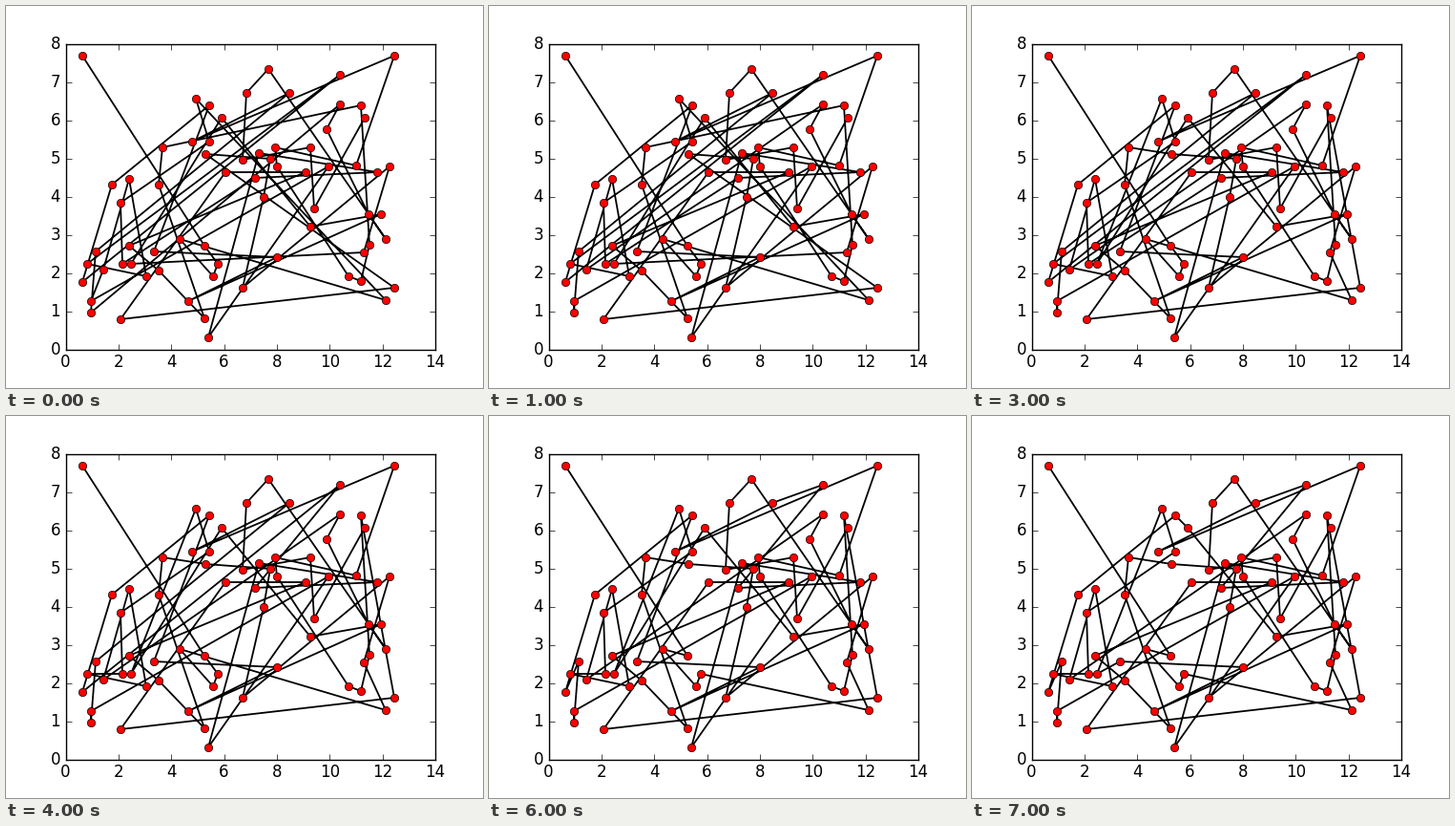
Animation, 500 px wide and 400 px high, one loop 8 s. Source, as a matplotlib script:

```python
import matplotlib.pyplot as plt
import numpy as np
from matplotlib.animation import FuncAnimation

plt.rcParams["font.family"] = "DejaVu Sans"
plt.rcParams["font.size"] = 12

STEP_MS = 1000

# Cities in the order of the first route, in stage pixels.
CITIES = [
    (80, 52), (208, 251), (222, 270), (217, 283), (182, 244), (398, 308),
    (199, 97), (213, 142), (120, 206), (122, 270), (261, 180), (389, 174),
    (265, 154), (212, 347), (338, 168), (89, 309), (102, 276), (129, 181),
    (147, 283), (85, 270), (350, 72), (80, 289), (111, 187), (213, 104),
    (155, 257), (284, 263), (191, 309), (393, 218), (319, 231), (226, 117),
    (131, 270), (375, 258), (402, 168), (248, 295), (270, 200), (277, 160),
    (209, 155), (407, 295), (120, 328), (230, 174), (314, 174), (129, 251),
    (160, 277), (208, 327), (160, 187), (164, 148), (372, 104), (381, 250),
    (372, 288), (359, 283), (284, 168), (282, 148), (367, 167), (407, 52),
    (195, 142), (297, 91), (94, 257), (89, 321), (350, 103), (336, 129),
    (380, 218), (398, 244), (275, 66), (252, 91), (248, 161), (319, 148),
    (323, 212), (376, 117),
]

# Each 2-opt move turns round one stretch of the route (first, last).
MOVES = [(16, 57), (6, 42), (12, 20), (39, 53), (31, 39), (2, 4), (43, 48)]


def to_data(pixels):
    x, y = np.array(pixels, float).T
    return np.column_stack([(x - 62.5) * 14 / 387.5, (360 - y) / 40])


def route(step):
    order = np.arange(len(CITIES))
    for first, last in MOVES[:step]:
        order[first:last + 1] = order[first:last + 1][::-1].copy()
    return cities[order]


cities = to_data(CITIES)

fig = plt.figure(figsize=(5, 4), dpi=100, facecolor="white")
ax = fig.add_axes([0.125, 0.1, 0.775, 0.8])
ax.set(xlim=(0, 14), ylim=(0, 8), xticks=range(0, 15, 2), yticks=range(9))
ax.tick_params(direction="in", top=True, right=True, length=4, width=0.5)
ax.tick_params(axis="x", pad=3)
ax.tick_params(axis="y", pad=4)
for label in ax.get_yticklabels():
    label.set_va("center")
for spine in ax.spines.values():
    spine.set_linewidth(1)

path, = ax.plot([], [], color="black", lw=1.3, solid_joinstyle="round", zorder=1.5)
ax.plot(*cities.T, "o", color="red", ms=6, mec="black", mew=0.5, zorder=2)


def draw(step):
    path.set_data(*route(step).T)
    return [path]


anim = FuncAnimation(fig, draw, frames=len(MOVES) + 1, interval=STEP_MS,
                     repeat=True, repeat_delay=0, blit=False)
plt.show()
```
